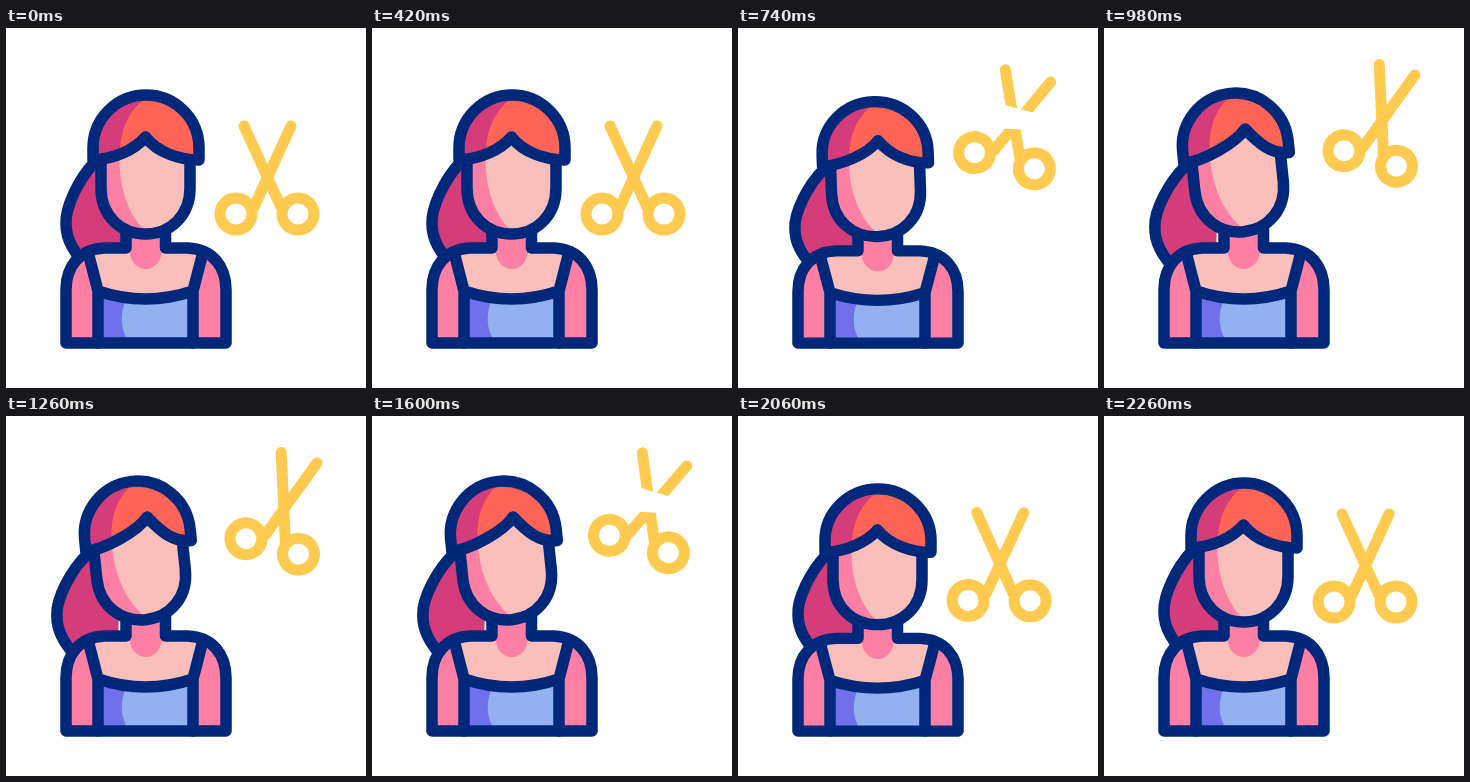
Animation of 360 by 360 pixels, one loop 2400 ms. Source, as an HTML page:

```html
<!DOCTYPE html>
<html lang="en">
<head>
<meta charset="utf-8">
<title>Haircut</title>
<style>
  html, body { margin: 0; width: 100%; height: 100%; overflow: hidden; background: #fff; }
  svg { display: block; width: 100vw; height: 100vh; }
  .line { fill: none; stroke: #00287a; stroke-width: 11.5; stroke-linecap: round; stroke-linejoin: round; }
  .skin { fill: #fabfba; }
  .pink { fill: #fd80a4; }
  .plum { fill: #d43d7a; }
  .blade { fill: none; stroke: #ffca50; stroke-width: 11; stroke-linecap: round; }
</style>
</head>
<body>
<svg viewBox="0 0 360 360">
  <defs>
    <path id="torso" d="M60 315V262C60 238 74 221 98 220H120V198H159.500V220H182C206 221 220 238 220 262V315Z"/>
    <path id="face" d="M95 126V160C95 188 115 206 139.500 206S184 188 184 160V126"/>
    <clipPath id="faceClip"><use href="#face"/></clipPath>
    <clipPath id="hairClip"><path class="hair"/></clipPath>
  </defs>

  <g id="woman">
    <g id="tail">
      <path class="plum" d="M88 135C72 152 59 180 60 196C60 212 68 226 84 240L122 226V190L100 135Z"/>
      <path class="line" d="M88 135C72 152 59 180 60 196C60 212 68 226 84 240"/>
    </g>

    <use href="#torso" class="pink"/>
    <path class="skin" d="M83 226L98 220H182L196 226L187 263Q139.500 279 92 263Z"/>
    <path class="pink" d="M120 198H159.500V220L155.500 226A16 18.300 0 0 1 124 226L120 220Z"/>
    <path fill="#93b1f1" d="M92 263Q139.500 279 187 263V315H92Z"/>
    <path fill="#7070ea" d="M92 263Q105 269 120 271C113 288 115 302 123 315H92Z"/>
    <path class="line" d="M83 228L92 263V315M196 228L187 263V315M92 263Q139.500 279 187 263"/>
    <use href="#torso" class="line"/>

    <g id="head">
      <path class="skin" d="M95 127L139 100L160 100L184 127Z"/>
      <use href="#face" class="skin"/>
      <path class="pink" d="M95 127L114 114V127Z"/>
      <path class="pink" clip-path="url(#faceClip)" d="M90 115H114C111 155 120 185 142 206H90Z"/>
      <use href="#face" class="line"/>
      <path class="hair" fill="#ff6456"/>
      <path class="plum" clip-path="url(#hairClip)" d="M80 60H150V64C126 76 112 98 114 135H80Z"/>
      <path class="hair line"/>
    </g>
  </g>

  <g id="scissors">
    <g id="armA" class="blade">
      <path d="M238 98L275 179"/>
      <circle cx="292" cy="186" r="16"/>
    </g>
    <g id="armB" class="blade">
      <path d="M285 98L248 179"/>
      <circle cx="230" cy="186" r="16"/>
    </g>
    <path id="gap" fill="#fff" d="M239 132L284 132V148L239 158Z"/>
  </g>
</svg>
<script>
const LOOP = 2400;
const get = id => document.getElementById(id);
const move = (id, value) => get(id).setAttribute("transform", value);

// Eased progress from 0 to 1 between two times
function ease(t, from, to) {
  const u = Math.min(1, Math.max(0, (t - from) / (to - from)));
  return u * u * (3 - 2 * u);
}

function draw(t) {
  // The woman squashes, then turns her head; she squashes again on the way back
  const turn = ease(t, 640, 900) - ease(t, 1640, 1880);
  const squash = ease(t, 420, 640) - ease(t, 640, 900)
               + ease(t, 1640, 1880) - ease(t, 1880, 2260);
  move("woman", `translate(0 320) scale(1 ${1 - 0.043 * squash}) translate(0 -320)`);
  move("head", `translate(${-5.5 * turn} ${-2 * turn}) rotate(${-6 * turn} 139.5 150)`);
  move("tail", `translate(${-7 * turn} ${3.5 * turn}) rotate(${2 * turn} 88 135)`);

  const x = 139.5 + 12 * turn, y = 109 - 5 * turn;
  const hair = "M87 132V120A53 53 0 0 1 193 120V132" +
    `C175 132 ${x + 12} ${y + 16} ${x} ${y}C${x - 11} ${y + 13} 108 131 87 132Z`;
  for (const el of document.querySelectorAll(".hair")) el.setAttribute("d", hair);

  // The scissors rise, snip three times and sink
  const lift = ease(t, 420, 810) - ease(t, 1680, 2100);
  const snipping = t > 780 && t < 1620;
  const shut = snipping ? (1 - Math.cos((t - 780) / 280 * 2 * Math.PI)) / 2 : 0;
  move("scissors", `translate(${16.5 * lift} ${-56.5 * lift}) rotate(${16.5 * lift} 261.5 149)`);
  move("armA", `rotate(${9 * shut} 261.5 149)`);
  move("armB", `rotate(${-9 * shut} 261.5 149)`);
  get("gap").style.display = lift > 0.85 && shut < 0.2 ? "" : "none";
}

const start = performance.now();
function tick() {
  draw((performance.now() - start) % LOOP);
  requestAnimationFrame(tick);
}
tick();
</script>
</body>
</html>
```
